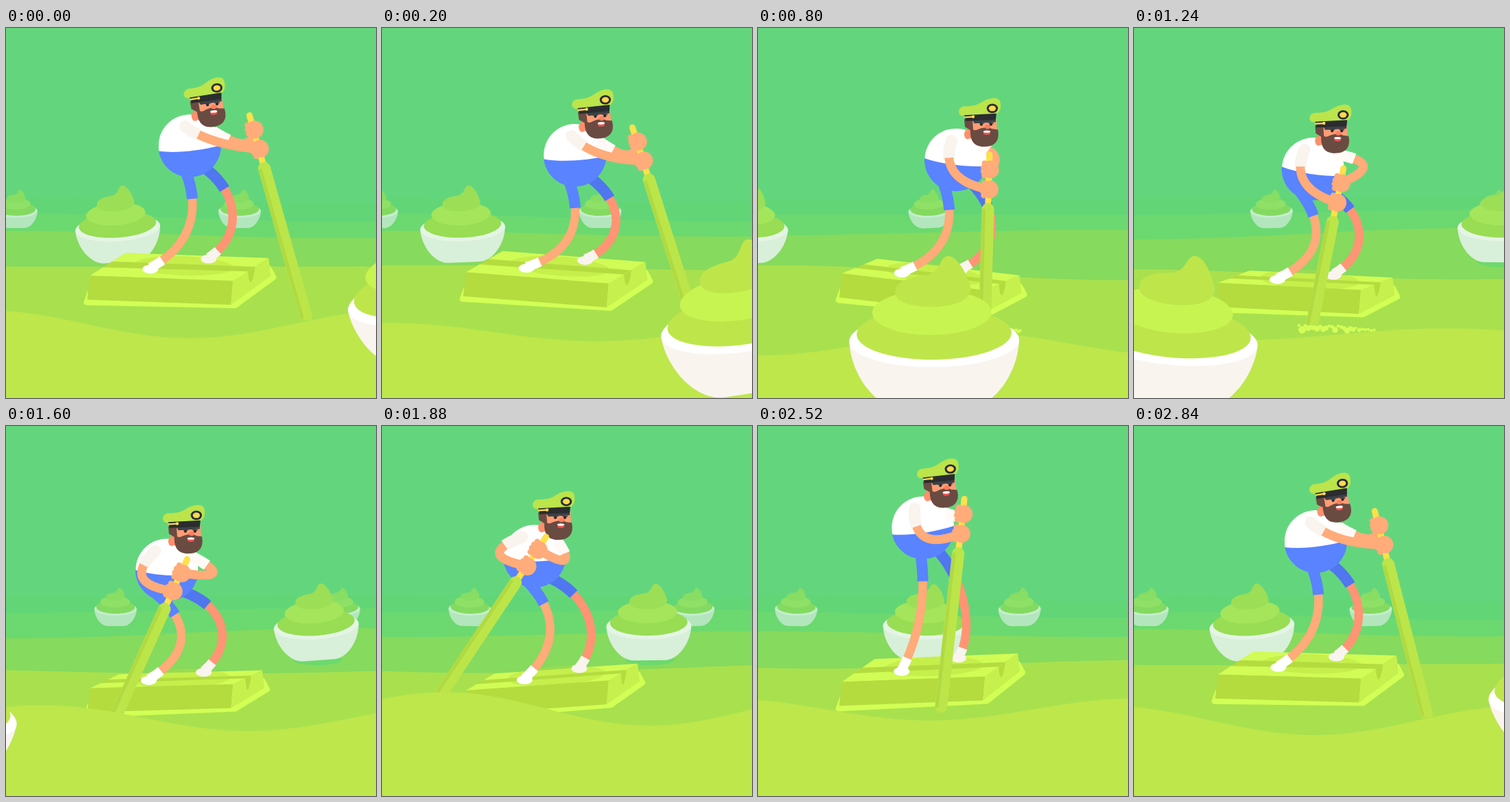
Write an HTML page with a canvas that moves like this. It is 540 by 540 pixels and loops after 2.88 s.

```html
<!DOCTYPE html>
<html lang="en">
<head>
<meta charset="utf-8">
<title>Sailing the green sea</title>
<style>
html, body { margin: 0; width: 100%; height: 100%; overflow: hidden; background: #63d67d; }
canvas { display: block; width: 100%; height: 100%; }
</style>
</head>
<body>
<canvas id="stage" width="540" height="540"></canvas>
<script>
const ctx = document.getElementById('stage').getContext('2d');
const LOOP = 2880, STEP = 40, TAU = Math.PI * 2;
const SKIN = '#ffab7a', SKIN_FAR = '#ff9574', BEARD = '#6a4b42', INK = '#2b2c2f';
const BLUE = '#5983ff', BLUE_FAR = '#5076f0', CREAM = '#f9f4ee';

// Looping motion: a swing once per loop, plus an optional one twice per loop,
// each given by its size and the moment of its peak.
const swing = (mean, size, peak, size2 = 0, peak2 = 0) => p =>
  mean + size * Math.cos(TAU * (p - peak)) + size2 * Math.cos(2 * TAU * (p - peak2));

const body = {
  x: swing(257, 36, 0.2),
  y: swing(184, 25.4, 0.394, 13, 0.075),
  tilt: swing(0.7, 8.5, 0.38),
  headX: swing(45.5, 4, 0.3, 5, 0.22),
  headY: swing(-80, 4.2, 0.34, 2.4, 0.2),
  nod: p => -6 * Math.max(0, Math.cos(TAU * (p - 0.97))) ** 3,
  shoulder: swing(-11, 7, 0.15),
  farElbow: swing(4, 24, 0.55)
};
const paddle = {
  x: swing(307, 60.3, 0.149, 13, 0.48),
  y: swing(159, 47, 0.4, 9, 0.06),
  lean: swing(-8, 23, 0.12, 7, -0.01),
  surface: swing(430, 8, 0.33)
};
const deck = {
  y: swing(370, 16, 0.66),
  tilt: swing(1.2, 5.8, 0.225),
  depthX: swing(48, 6, 0.13),
  depthY: swing(-26, -8, 0.93)
};

// Each sea layer heaves and carries a cosine and a sine wave along x.
const still = swing(0, 0, 0);
const seas = {
  haze: { color: '#62d676', length: 1000, heave: swing(249, 2, 0), cos: swing(-2, 3, 0.4), sin: still },
  far: { color: '#6bd96f', length: 1000, heave: swing(273, 4, 0), cos: swing(-1, 5, 0.5), sin: still },
  back: { color: '#86da5d', length: 1000, heave: swing(301.5, 3, 0.75), cos: swing(1.5, 7, 0.47), sin: still },
  mid: { color: '#a9e14e', length: 1000, heave: swing(353.5, 6, 0.42), cos: swing(-2, 8.5, 0.79), sin: swing(1.5, 4, 0.7) },
  front: { color: '#bee74b', length: 600, heave: swing(434, 27, 0.26), cos: swing(-6, 13, 0.3, 10, 0.28), sin: swing(-2, 6, 0.15, 12, 0.91) }
};

const add = (p, x, y) => [p[0] + x, p[1] + y];
const mix = (a, b, s) => [a[0] + (b[0] - a[0]) * s, a[1] + (b[1] - a[1]) * s];
const clamp = v => Math.max(0, Math.min(1, v));
const rad = deg => deg * Math.PI / 180;

function fill(color, path) {
  ctx.fillStyle = color;
  if (path) ctx.fill(path); else ctx.fill();
}
function poly(color, pts, round = 0) {
  ctx.beginPath();
  pts.forEach(p => ctx.lineTo(...p));
  ctx.closePath();
  fill(color);
  if (round) {
    ctx.strokeStyle = color;
    ctx.lineWidth = round;
    ctx.lineJoin = 'round';
    ctx.stroke();
  }
}
function oval(color, x, y, rx, ry = rx, rot = 0) {
  ctx.beginPath();
  ctx.ellipse(x, y, rx, ry, rot, 0, TAU);
  fill(color);
}
function line(color, width, pts, cap = 'butt') {
  ctx.beginPath();
  pts.forEach(p => ctx.lineTo(...p));
  ctx.strokeStyle = color;
  ctx.lineWidth = width;
  ctx.lineCap = cap;
  ctx.lineJoin = 'round';
  ctx.stroke();
}
function placed(x, y, deg, scale, draw) {
  ctx.save();
  ctx.translate(x, y);
  ctx.rotate(rad(deg));
  ctx.scale(scale, scale);
  draw();
  ctx.restore();
}

function sea({ color, length, heave, cos, sin }, p) {
  const k = TAU / length, h = heave(p), c = cos(p), s = sin(p);
  ctx.beginPath();
  ctx.moveTo(0, 540);
  for (let x = 0; x <= 540; x += 6) ctx.lineTo(x, h + c * Math.cos(k * x) + s * Math.sin(k * x));
  ctx.lineTo(540, 540);
  fill(color);
}

const DISH = new Path2D('M-124 0C-122 50-85 100-45 100H45C85 100 122 50 124 0Z');
const TIP = new Path2D('M-56-72C-55-87-35-93-12-95C12-98 8-123 22-123C36-122 50-95 54-76C56-58 28-49-2-49C-30-49-57-55-56-72Z');
function bowl(x, y, deg, scale, [dish, rim, base, light, top]) {
  placed(x, y, deg, scale, () => {
    fill(dish, DISH);
    oval(rim, 0, 0, 124, 39);
    oval(base, 0, -10, 113, 38);
    oval(light, -3, -41, 87, 33);
    fill(top, TIP);
  });
}
const FAR = ['#b3e6bd', '#c5eecd', '#84da61', '#8fe066', '#88dd63'];
const MID = ['#d8efd9', '#e4f5e4', '#98dd54', '#a4e55b', '#9cdf57'];
const NEAR = [CREAM, '#ffffff', '#bee64a', '#c8f451', '#bee64a'];

function farBowls(p) {
  for (let i = 0; i < 3; i++) {
    bowl(15 + 326 * (i - p), 267, 2 * Math.sin(TAU * p + i * 3), 0.25, FAR);
  }
}
function midBowls(p) {
  for (let i = 0; i < 2; i++) {
    const x = 163 + 652 * (i - p);
    ctx.globalAlpha = clamp((x - 330) / 60);
    oval('#6cd96c', x + 2, 341, 36, 8);
    ctx.globalAlpha = 1;
    bowl(x, 292, -4 * Math.cos(TAU * (x - 163) / 290), 0.5, MID);
  }
}
// The near bowl rides over a broad swell.
function nearBowl(p) {
  const x = 621 - 1310 * (p < 0.83 ? p : p - 1);
  const v = (x - 235) / 386;
  bowl(x, 456 - 66 * v ** 4, -11 * v, 1, NEAR);
}

function raft(p) {
  const a = [122.5, deck.y(p)], turn = rad(deck.tilt(p));
  const b = add(a, 209 * Math.cos(turn), 209 * Math.sin(turn));
  const dx = deck.depthX(p), dy = deck.depthY(p), c = add(b, dx, dy);
  const at = (u, v) => add(mix(a, b, u), dx * v, dy * v);
  const top = '#d1fb55', side = '#b4dc3f', end = '#c6f04d';
  poly('#d2ff55', [add(a, -5, 39), add(b, 3, 36), add(c, 7, 28), add(c, 0, 15), add(a, 0, 25)], 8);
  poly(side, [at(0, 0.62), at(1, 0.62), at(1, 0.35), at(0, 0.35)]);
  poly(top, [at(0, 0.62), at(1, 0.62), at(1, 1), at(0, 1)]);
  poly(top, [a, b, at(1, 0.42), at(0, 0.37)]);
  poly(side, [a, b, add(b, -3, 35), add(a, -4, 35)]);
  const l = at(1, 0.42), r = at(1, 0.62), m = at(0.52, 0.55);
  poly(end, [b, l, r, c, add(c, 3, 26), add(b, -3, 35)]);
  ctx.beginPath();
  ctx.moveTo(...l);
  ctx.bezierCurveTo(l[0] + 1, l[1] + 22, r[0] - 4, r[1] + 28, ...r);
  fill(side);
  ctx.globalAlpha = 0.4;
  oval(side, m[0], m[1], 72, 14, turn);
  ctx.globalAlpha = 1;
  return at;
}

// Two inner curve points between a and b: how far along, and how far aside.
function bend(a, b, bulge, [s1, s2], [o1, o2]) {
  const dx = b[0] - a[0], dy = b[1] - a[1], d = Math.hypot(dx, dy) || 1;
  const point = (s, o) => add(mix(a, b, s), dy / d * bulge * o, -dx / d * bulge * o);
  return [a, point(s1, o1), point(s2, o2), b];
}
// A limb of fixed length bulges more the closer its ends are.
const slack = (a, b, length) =>
  0.34 * Math.sqrt(Math.max(0, length ** 2 - (b[0] - a[0]) ** 2 - (b[1] - a[1]) ** 2));

function limb([a, b, c, d], skin, width, cloth, clothWidth, cuff, shoe) {
  const at = s => mix(mix(mix(a, b, s), mix(b, c, s), s), mix(mix(b, c, s), mix(c, d, s), s), s);
  const part = (from, to) => Array.from({ length: 25 }, (_, i) => at(from + (to - from) * i / 24));
  line(skin, width, part(cuff * 0.8, 1));
  line(cloth, clothWidth, part(0, cuff));
  if (shoe) line(shoe, 14, part(0.9, 1));
}

function leg(hip, sole, along, aside, skin, cloth, shoe) {
  const heel = add(sole, 0, -6);
  limb(bend(hip, heel, slack(hip, heel, 177), along, aside), skin, 12.5, cloth, 16, 0.26, shoe);
  oval(shoe, sole[0], sole[1] - 4, 11.5, 6.5);
}

function torso(x, y, deg) {
  placed(x, y, deg, 1, () => {
    oval('#ffffff', 0, 0, 45.5);
    ctx.beginPath();
    ctx.arc(0, 0, 46, 0, TAU);
    ctx.clip();
    fill(BLUE, new Path2D('M-50 3C-20 10 15 9 50 3V50H-50Z'));
  });
}

const CAP = new Path2D('M-42 11C-52 11-51-3-40-3C-27-3-22-5-14-10C-4-16 12-19 12-6C13 2 10 5 6 9Z');
const WHISKERS = new Path2D('M-33 16H-29L-28 31C-24 34-19 29-14 28.5C-8 27-4 28 0 30L8 31C11 45 6 56-12 56C-27 56-33 47-32 30Z');
function head(x, y, deg) {
  placed(x, y, deg, 1, () => {
    line('#ff8f6c', 12, [[-30, 28], [-32, 44]]);
    poly(BEARD, [[-41, 16], [-29, 16], [-32, 32], [-40, 27]]);
    poly('#ff9d74', [[-30, 15], [6, 15], [7, 36], [-28, 40]]);
    oval('#ff8f6c', -36, 38, 5, 7);
    fill(BEARD, WHISKERS);
    oval('#ff7d5e', -7, 27, 4, 3);
    oval('#ef5350', -8, 36, 5, 2.6);
    oval('#ffffff', -8, 33.8, 5.2, 1.7);
    [-16, -2].forEach(ex => {
      line(BEARD, 2, [[ex - 4, 21], [ex + 4, 21.5]]);
      oval(INK, ex, 23.2, 2.2);
    });
    poly('#3b4247', [[-30, 16], [5, 14], [5, 20], [-26, 22]]);
    fill('#bce44b', CAP);
    poly(INK, [[-41, 10], [6, 7.5], [5, 16.5], [-39, 18.5]]);
    line('#ffdc4d', 2.4, [[-41, 13], [-29, 12.3]]);
    oval('#ffdc4d', -28, 12.2, 2.2);
    oval(INK, 0, 0, 8.2, 6.8);
    oval('#ffd74f', 0, 0, 5.2, 4);
  });
}

function hand([x, y], deg) {
  placed(x, y, deg, 1, () => {
    oval(SKIN, 2, 0, 12.5, 13);
    [-9, -3, 3, 9].forEach(k => oval(SKIN, -9 + Math.abs(k) / 4, k, 4.2));
  });
}

// The blade shows only above the water, so the surface cuts it off.
function oar(along, surface) {
  line('#ffe04a', 9, [along(0), along(80)], 'round');
  ctx.save();
  ctx.beginPath();
  ctx.rect(0, 0, 540, surface);
  ctx.clip();
  line('#bce54a', 18, [along(80), along(305)], 'round');
  line('#b0d942', 5, [along(82, -6), along(305, -6)], 'round');
  ctx.restore();
}

function foam(p, x, y) {
  const size = clamp((p - 0.18) * 14) * clamp((0.54 - p) * 14);
  const reach = 70 + 260 * (p - 0.278);
  for (let i = 0; size && i < 26; i++) {
    const s = i / 25, noise = Math.abs(Math.sin(i * 12.9898) * 43758.5453) % 1;
    const r = (1.2 + 3.6 * noise * (1 - s * 0.6) + (s < 0.75 ? 1 : 0)) * size;
    oval('#d3fd57', x - 18 + s * reach, y + 1 + (noise - 0.5) * 7 + s * 2, r);
  }
}

function sailor(p, footing) {
  const x = body.x(p), y = body.y(p), tilt = body.tilt(p);
  const lean = paddle.lean(p), surface = paddle.surface(p);
  const sin = Math.sin(rad(lean)), cos = Math.cos(rad(lean));
  const grip = [paddle.x(p), paddle.y(p)];
  const along = (d, side = 0) => add(grip, sin * d + cos * side, cos * d - sin * side);
  const farHand = along(22), nearHand = along(51);
  const hipTurn = rad(18 + 1.6 * tilt);
  const hip = [x - 38 * Math.sin(hipTurn), y + 38 * Math.cos(hipTurn)];
  const shoulder = [x + body.shoulder(p), y - 28];

  leg([x + 18, y + 30], footing(0.64, 0.76), [0.3, 0.8], [1.33, 1.33], SKIN_FAR, BLUE_FAR, CREAM);
  leg(hip, footing(0.36, 0.25), [0.27, 0.64], [1.15, 1.5], SKIN, BLUE, '#ffffff');
  torso(x, y, tilt);

  const [a, b, c, d] = bend([x + 34, y - 21], farHand, body.farElbow(p), [0.3, 0.65], [1.33, 1.33]);
  limb([a, add(b, 20, 0), add(c, 20, 0), d], SKIN, 13, '#fffaf6', 16, 0.22);
  head(x + body.headX(p), y + body.headY(p), body.nod(p));
  oar(along, surface);
  hand(farHand, -lean);
  oval(CREAM, ...shoulder, 8.5);
  limb(bend(shoulder, nearHand, -slack(shoulder, nearHand, 115), [0.2, 0.53], [1.1, 1.55]),
    SKIN, 13, CREAM, 17, 0.28);
  hand(nearHand, -lean);
  foam(p, along((surface - grip[1]) / cos)[0], surface);
}

function draw(p) {
  ctx.fillStyle = '#63d67d';
  ctx.fillRect(0, 0, 540, 540);
  sea(seas.haze, p);
  sea(seas.far, p);
  farBowls(p);
  sea(seas.back, p);
  midBowls(p);
  sea(seas.mid, p);
  sailor(p, raft(p));
  sea(seas.front, p);
  nearBowl(p);
}

const start = performance.now();
function tick() {
  const t = (performance.now() - start) % LOOP;
  draw(Math.floor(t / STEP) * STEP / LOOP);
  requestAnimationFrame(tick);
}
tick();
</script>
</body>
</html>
```
